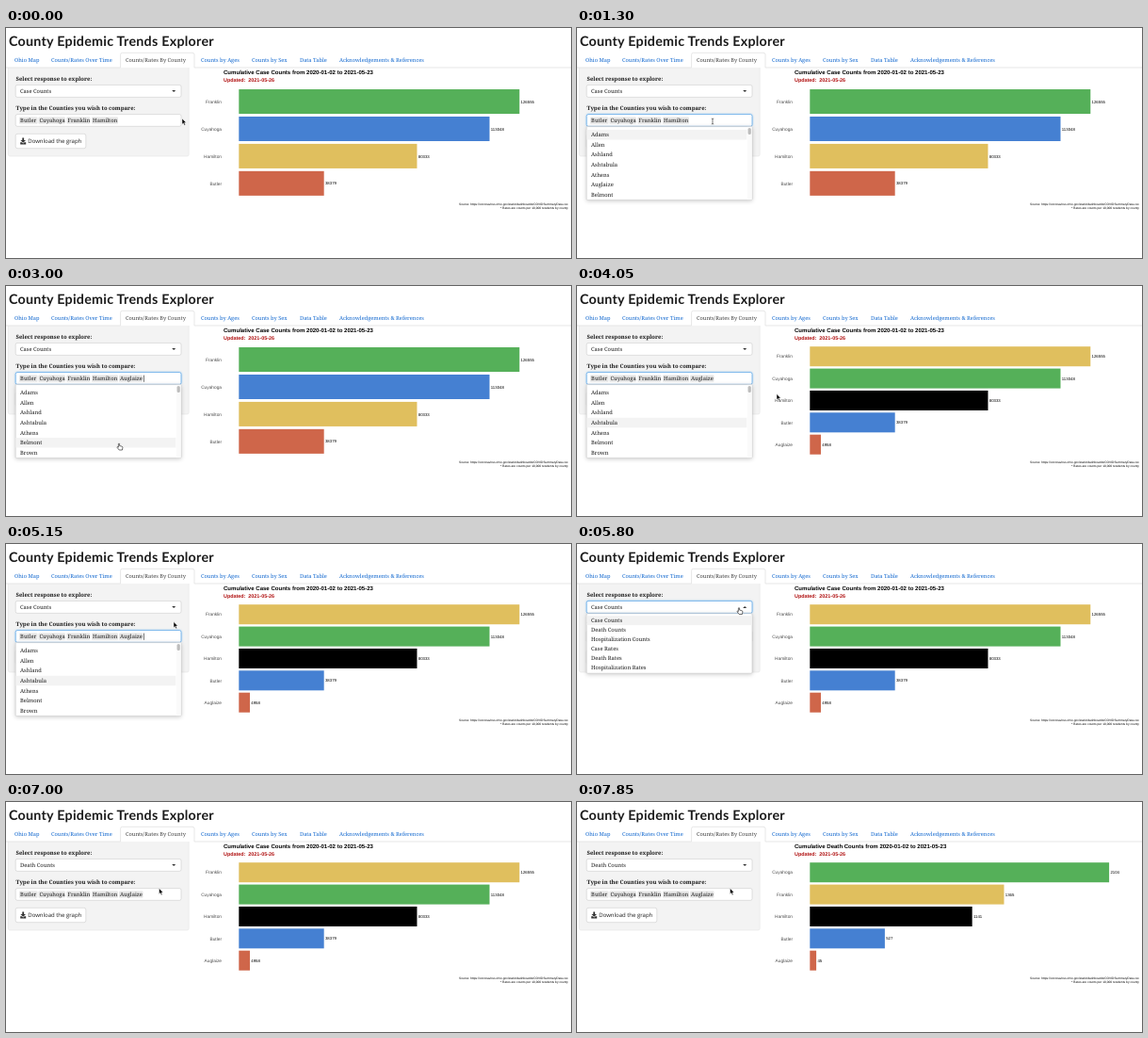
An HTML page for the animation above (8000 ms loop, 600 by 244 pixels).

```html
<!DOCTYPE html>
<html lang="en">
<head>
<meta charset="utf-8">
<title>County dashboard</title>
<style>
  html, body { margin: 0; width: 100%; height: 100%; overflow: hidden; background: #fff; }
  svg { display: block; width: 100%; height: 100%; text-rendering: geometricPrecision; }
  text { font: 5.8px "Noto Serif", serif; fill: #1c1c1c; white-space: pre; }
  .head { font: 700 14.3px Lato, sans-serif; letter-spacing: .25px; }
  .tab { font-size: 5.7px; fill: #1268cf; }
  .tab.on { fill: #444; }
  .label { font-weight: 700; font-size: 5.95px; }
  .button { font: 6px "Open Sans", sans-serif; }
  .plot text { font-family: "Liberation Sans", Arial, sans-serif; fill: #000; }
  .plot .title { font-size: 6.05px; font-weight: 700; }
  .plot .date { font-size: 5.4px; font-weight: 700; fill: #b01010; }
  .plot .county { font-size: 4.8px; fill: #4d4d4d; text-anchor: end; }
  .plot .value { font-size: 4.3px; }
  .plot .note { font-size: 3.25px; text-anchor: end; }
  .box { fill: #fff; stroke: #ccc; stroke-width: .6; }
  .box.focus { stroke: #70b0ea; stroke-width: .9; filter: drop-shadow(0 0 1px #66afe988); }
  .list { fill: #fff; stroke: #c8c8c8; stroke-width: .6; filter: drop-shadow(0 1.8px 2.2px #0003); }
</style>
</head>
<body>
<svg id="stage" viewBox="0 0 600 244"></svg>
<script>
const LOOP = 8000;
const PICK = 2900, CHART_A = 3600, SWITCH = 6800, CHART_B = 7450;
const COLORS = { red: '#cf664a', blue: '#4580d2', green: '#55b059', yellow: '#e0bf5e', black: '#000' };

const rect = (x, y, w, h, attrs = '') => `<rect x="${x}" y="${y}" width="${w}" height="${h}" ${attrs}/>`;
const text = (x, y, s, cls = '') => `<text x="${x}" y="${y}" class="${cls}">${s}</text>`;
const group = (id, body) => `<g id="${id}">${body}</g>`;

// Bars share a fixed band; the pitch follows from how many there are.
function chart(id, measure, scale, rows) {
  const left = 247.3, pitch = 121.5 / (rows.length + .2);
  const bars = rows.map(([name, value, color], i) => {
    const mid = 60.7 + pitch * (.6 + i), w = value * scale;
    return rect(left, mid - pitch * .45, w, pitch * .9, `fill="${COLORS[color]}"`) +
      text(229, mid + 1.7, name, 'county') + text(left + w + 1.3, mid + 1.6, value, 'value');
  });
  return group(id, text(231, 49, `Cumulative ${measure} Counts from 2020-01-02 to 2021-05-23`, 'title') + bars.join(''));
}

const tabs = [[9, 'Ohio Map'], [48, 'Counts/Rates Over Time'], [127, 'Counts/Rates By County'],
  [207, 'Counts by Ages'], [261, 'Counts by Sex'], [312, 'Data Table'], [354, 'Acknowledgements &amp; References']];
const tags = [[14, 19.5, 'Butler'], [34.4, 28.5, 'Cuyahoga'], [64.4, 25, 'Franklin'], [91, 28, 'Hamilton'], [120, 25.5, 'Auglaize']];
const tag = ([x, w, s]) => rect(x, 94.4, w, 7.4, 'rx="1" fill="#e6e6e6"') + text(x + 1.1, 100.2, s);

const counties = ['Adams', 'Allen', 'Ashland', 'Ashtabula', 'Athens', 'Auglaize', 'Belmont', 'Brown'];
const before = counties.slice(0, 7), after = counties.filter(c => c !== 'Auglaize');
const countyRows = names => names.map((s, i) => text(15, 115.2 + i * 10.6, s)).join('');
const measures = ['Case Counts', 'Death Counts', 'Hospitalization Counts', 'Case Rates', 'Death Rates', 'Hospitalization Rates'];

const stage = document.getElementById('stage');
stage.innerHTML =
  rect(0, 0, 600, 244, 'fill="#fff"') +
  text(3, 19, 'County Epidemic Trends Explorer', 'head') +
  rect(2.3, 38, 191.9, 98, 'rx="2" fill="#f3f3f3" stroke="#e4e4e4" stroke-width=".6"') +
  rect(0, 24, 600, 18, 'fill="#fff"') +
  '<path d="M0 42H121.6V28.3q0-2 2-2H198q2 0 2 2V42H600" fill="none" stroke="#ddd" stroke-width=".7"/>' +
  tabs.map(([x, s], i) => text(x, 36.2, s, i === 2 ? 'tab on' : 'tab')).join('') +
  text(10.5, 56.2, 'Select response to explore:', 'label') +
  text(10.5, 87.2, 'Type in the Counties you wish to compare:', 'label') +
  rect(10.2, 60.4, 175.8, 13, 'id="select" rx="1.8" class="box"') +
  group('choice0', text(15, 69, measures[0])) + group('choice1', text(15, 69, measures[1])) +
  '<path id="arrow" fill="#333"/>' +
  rect(10.2, 91.6, 175.8, 12.7, 'id="multi" rx="1.8" class="box"') +
  tags.slice(0, 4).map(tag).join('') + group('added', tag(tags[4])) +
  rect(0, 94.6, .6, 7.2, 'id="caret" fill="#222"') +
  rect(10.2, 112.3, 74.6, 15.4, 'rx="1.8" class="box"') +
  '<path d="M17.3 116.6h1.8v2.4h1.9l-2.8 2.8-2.8-2.8h1.9zM15.2 121.2h1.6l1.4 1.4 1.4-1.4h1.6v2.2h-6z" fill="#333"/>' +
  text(23.3, 122.2, 'Download the graph', 'button') +
  '<g class="plot">' +
    chart('plot0', 'Case', 298 / 126555, [['Franklin', 126555, 'green'], ['Cuyahoga', 113048, 'blue'],
      ['Hamilton', 80333, 'yellow'], ['Butler', 38379, 'red']]) +
    chart('plot1', 'Case', 298 / 126555, [['Franklin', 126555, 'yellow'], ['Cuyahoga', 113048, 'green'],
      ['Hamilton', 80333, 'black'], ['Butler', 38379, 'blue'], ['Auglaize', 4958, 'red']]) +
    chart('plot2', 'Death', 317.8 / 2104, [['Cuyahoga', 2104, 'green'], ['Franklin', 1365, 'yellow'],
      ['Hamilton', 1141, 'black'], ['Butler', 527, 'blue'], ['Auglaize', 45, 'red']]) +
    text(231, 56.8, 'Updated:  2021-05-26', 'date') +
    text(597, 188.3, 'Source: https://coronavirus.ohio.gov/static/dashboards/COVIDSummaryData.csv', 'note') +
    text(597, 192.2, '* Rates are counts per 10,000 residents by county', 'note') +
  '</g>' +
  group('counties',
    rect(10.2, 104.6, 175.8, 77.8, 'rx="1" class="list"') +
    rect(10.5, 0, 170, 10.6, 'id="countyHover" fill="#f3f3f3"') +
    group('rows0', countyRows(before)) + group('rows1', countyRows(after)) +
    rect(180.7, 104.9, 5, 77.2, 'fill="#fafafa"') +
    rect(181.6, 106, 3.2, 7, 'rx="1.6" fill="#bdbdbd"')) +
  group('measures',
    rect(10.2, 73.8, 175.8, 63.4, 'rx="1" class="list"') +
    rect(10.5, 0, 175.2, 9.9, 'id="measureHover" fill="#f2f2f2"') +
    measures.map((s, i) => text(15, 83.2 + i * 9.9, s)).join('')) +
  group('pointer', '<path d="M0 0V6.2L1.4 4.9 2.4 7.2 3.5 6.7 2.5 4.5H4.4Z" fill="#000" stroke="#fff" stroke-width=".5"/>') +
  group('beam', '<path d="M-1.2-3q1.2 0 1.2 .8 0-.8 1.2-.8M0-2.2V2.2M-1.2 3q1.2 0 1.2-.8 0 .8 1.2 .8" fill="none" stroke="#222" stroke-width=".6"/>') +
  group('hand', '<path d="M-.6 .4q.6-.8 1.2 0V2.6l2.3 .5q1.1 .3 1 1.4L3.4 7H.2L-1.9 4.4q-.2-1 .6-.8l.7 .5Z" fill="#fff" stroke="#111" stroke-width=".6" stroke-linejoin="round"/>');

const el = {};
stage.querySelectorAll('[id]').forEach(n => el[n.id] = n);
const show = (id, on) => el[id].style.display = on ? '' : 'none';

// Pointer path: time, x, y
const path = [[50, 187, 96], [700, 144, 99], [1300, 144, 99], [2050, 126, 142], [2550, 126, 142], [2850, 120, 167],
  [3500, 120, 167], [3780, 184, 146], [4020, 212, 114.5], [4400, 212, 114.5], [5100, 178, 82.5], [5350, 178, 82.5],
  [5650, 172, 67.5], [6250, 172, 67.5], [6480, 162.5, 91.5]];
function pointerAt(t) {
  const i = path.findIndex(p => p[0] > t);
  if (i === 0) return path[0].slice(1);
  if (i < 0) return path[path.length - 1].slice(1);
  const [t0, x0, y0] = path[i - 1], [t1, x1, y1] = path[i];
  const u = (t - t0) / (t1 - t0), k = u * u * (3 - 2 * u);
  return [x0 + (x1 - x0) * k, y0 + (y1 - y0) * k];
}

// The caret toggles at each of these times.
const blinks = [550, 1050, 1550, 2050, 2550, 3500, 4080, 4580, 5080, 5200];
const within = (t, a, b) => t >= a && t < b;
const rowAt = (y, top, pitch, count) => Math.max(0, Math.min(count - 1, Math.floor((y - top) / pitch)));

function draw(t) {
  const [x, y] = pointerAt(t);
  const multiOpen = within(t, 600, 5200), selectOpen = within(t, 5700, SWITCH);
  const picked = t >= PICK, switched = t >= SWITCH;

  el.multi.classList.toggle('focus', multiOpen);
  el.select.classList.toggle('focus', selectOpen);
  show('choice0', !switched);
  show('choice1', switched);
  el.arrow.setAttribute('d', selectOpen ? 'M176.2 68h4l-2-2.1z' : 'M176.2 66h4l-2 2.1z');
  show('added', picked);
  show('caret', blinks.filter(b => b <= t).length % 2);
  el.caret.setAttribute('x', picked ? 146.3 : 119.9);

  // The row last touched keeps its highlight once the pointer has left.
  show('counties', multiOpen);
  show('rows0', !picked);
  show('rows1', picked);
  const row = rowAt(pointerAt(Math.min(t, 3780))[1], 107.7, 10.6, 7);
  el.countyHover.setAttribute('y', 107.9 + row * 10.6);
  show('measures', selectOpen);
  el.measureHover.setAttribute('y', 76.2 + rowAt(y, 76.2, 9.9, 6) * 9.9);

  const plot = t < CHART_A ? 0 : t < CHART_B ? 1 : 2;
  for (let i = 0; i < 3; i++) show('plot' + i, i === plot);

  const inside = within(x, 10, 186);
  const overList = (multiOpen && y > 104.6) || (selectOpen && y > 73.8);
  const hand = inside && (overList || within(y, 60.4, 73.4));
  const beam = inside && !hand && within(y, 91.6, 104.6);
  const kind = hand ? 'hand' : beam ? 'beam' : 'pointer';
  for (const id of ['pointer', 'beam', 'hand']) show(id, id === kind);
  el[kind].setAttribute('transform', `translate(${x} ${y})`);
}

function tick() {
  draw(performance.now() % LOOP);
  requestAnimationFrame(tick);
}
tick();
</script>
</body>
</html>
```
